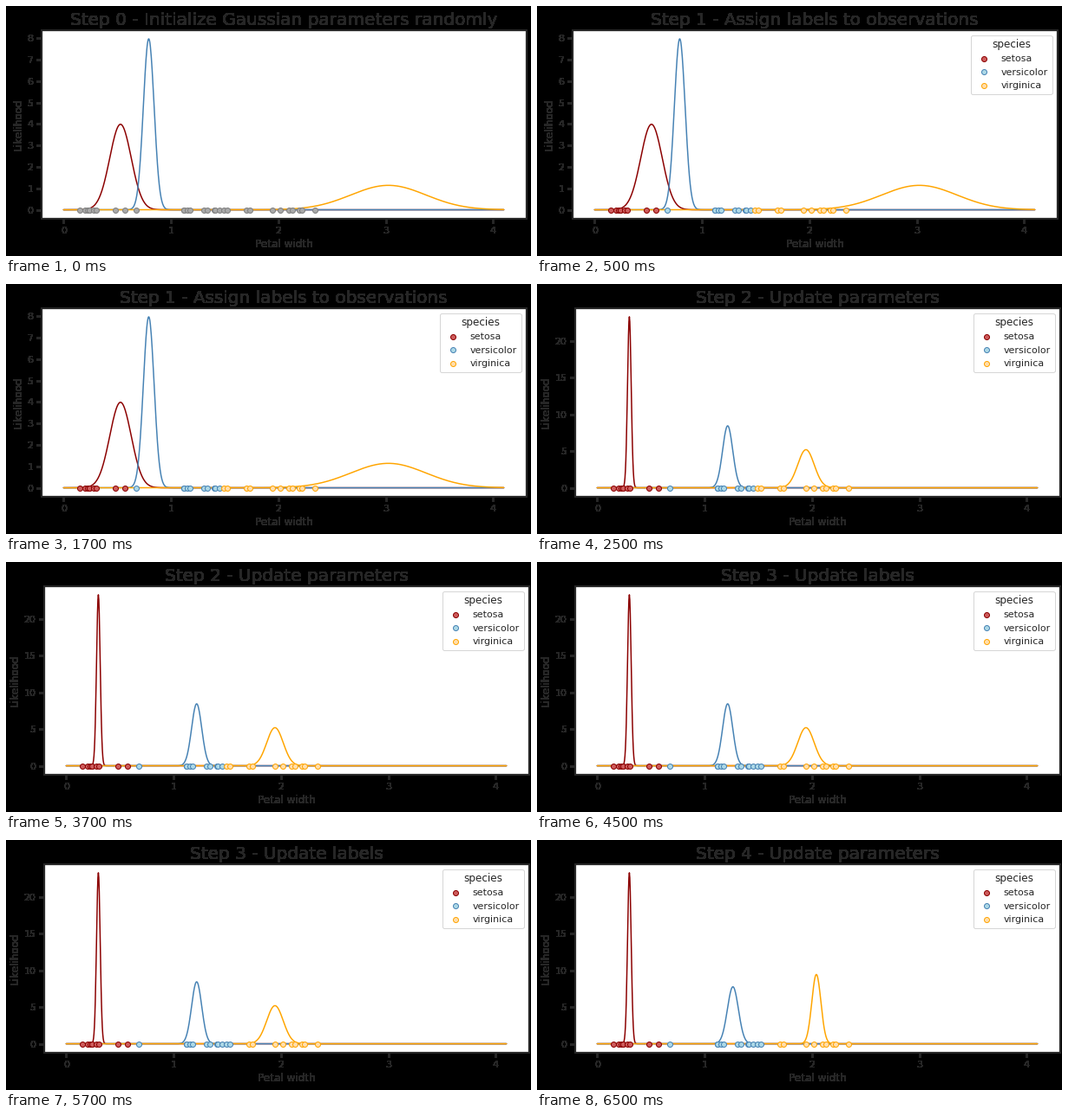
Recreate the animation shown at these times as a matplotlib script. Size 605x289 px, loop 8000 ms.

```python
import numpy as np
import matplotlib.pyplot as plt
from matplotlib.animation import FuncAnimation

WIDTH, HEIGHT, DPI = 605, 289, 72
AXES_W, AXES_H, AXES_TOP = 558, 217.44, 28
INK = "0.15"

plt.rcParams.update({
    "font.family": "DejaVu Sans",
    "text.color": INK, "axes.labelcolor": INK, "axes.edgecolor": INK,
    "xtick.color": INK, "ytick.color": INK,
    "axes.linewidth": 1.25, "axes.labelsize": 12, "axes.titlesize": 20,
    "xtick.labelsize": 11, "ytick.labelsize": 11,
    "xtick.major.size": 6, "ytick.major.size": 6,
    "xtick.major.width": 1.25, "ytick.major.width": 1.25,
    "legend.fontsize": 11, "legend.title_fontsize": 12,
    "lines.linewidth": 1.5, "lines.solid_capstyle": "round",
})

SPECIES = ["setosa", "versicolor", "virginica"]
CURVES = ["darkred", "steelblue", "orange"]
FILLS = ["indianred", "lightblue", "navajowhite"]

widths = np.array([
    0.152, 0.203, 0.223, 0.237, 0.239, 0.276, 0.308, 0.486, 0.572,
    0.672, 1.119, 1.123, 1.149, 1.177, 1.307, 1.335, 1.407, 1.411, 1.452,
    1.492, 1.525, 1.699, 1.735, 1.941, 2.014, 2.095, 2.127, 2.196, 2.220, 2.345])
grid = np.linspace(0, 4.1, 1000)

first_labels = np.split(widths, [9, 19])
second_labels = np.split(widths, [9, 21])


def fit(groups):
    """Mean and spread of every group; the variance serves as the spread."""
    return [(g.mean(), g.var()) for g in groups]


initial = [(0.53, 0.10), (0.793, 0.05), (3.025, 0.35)]
first_fit, second_fit = fit(first_labels), fit(second_labels)

# first frame, title, Gaussians, labelled groups
STEPS = [
    (0, "Initialize Gaussian parameters randomly", initial, None),
    (1, "Assign labels to observations", initial, first_labels),
    (5, "Update parameters", first_fit, first_labels),
    (9, "Update labels", first_fit, second_labels),
    (13, "Update parameters", second_fit, second_labels),
]


def gaussian(x, mean, sd):
    return np.exp(-0.5 * ((x - mean) / sd) ** 2) / (sd * np.sqrt(2 * np.pi))


def harden_edges(image, dpi):
    """Make every touched pixel opaque, so outer edges are not smoothed."""
    image = image.copy()
    image[..., 3] = image[..., 3] > 0
    return image, 0, 0


def dots(x, fill, edge, label=None):
    ax.plot(x, np.zeros_like(x), "o", ms=6, mew=1, mfc=fill, mec=edge,
            label=label, zorder=3)


fig = plt.figure(figsize=(WIDTH / DPI, HEIGHT / DPI), dpi=DPI, facecolor="black")
ax = fig.add_axes([0, 0, 1, 1])


def update(frame):
    number = max(i for i, step in enumerate(STEPS) if step[0] <= frame)
    _, title, params, groups = STEPS[number]
    left, tick_step = (41, 1) if params is initial else (44, 5)

    ax.clear()
    ax.set_agg_filter(harden_edges)
    ax.set_position([left / WIDTH, 1 - (AXES_TOP + AXES_H) / HEIGHT,
                     AXES_W / WIDTH, AXES_H / HEIGHT])

    peak = 0
    for (mean, sd), color in zip(params, CURVES):
        ax.plot(grid, gaussian(grid, mean, sd), color=color)
        peak = max(peak, gaussian(mean, mean, sd))

    if groups is None:
        dots(widths, "darkgray", "gray")
    else:
        for group in zip(groups, FILLS, CURVES, SPECIES):
            dots(*group)
        ax.legend(title="species", loc="upper right")

    ax.set(title=f"Step {number} - {title}",
           xlabel="Petal width", ylabel="Likelihood",
           xlim=(-0.205, 4.305), ylim=(-0.05 * peak, 1.05 * peak),
           xticks=range(5), yticks=np.arange(0, 1.05 * peak, tick_step, dtype=int))
    return []


anim = FuncAnimation(fig, update, frames=16, interval=500, repeat=True)
plt.show()
```
